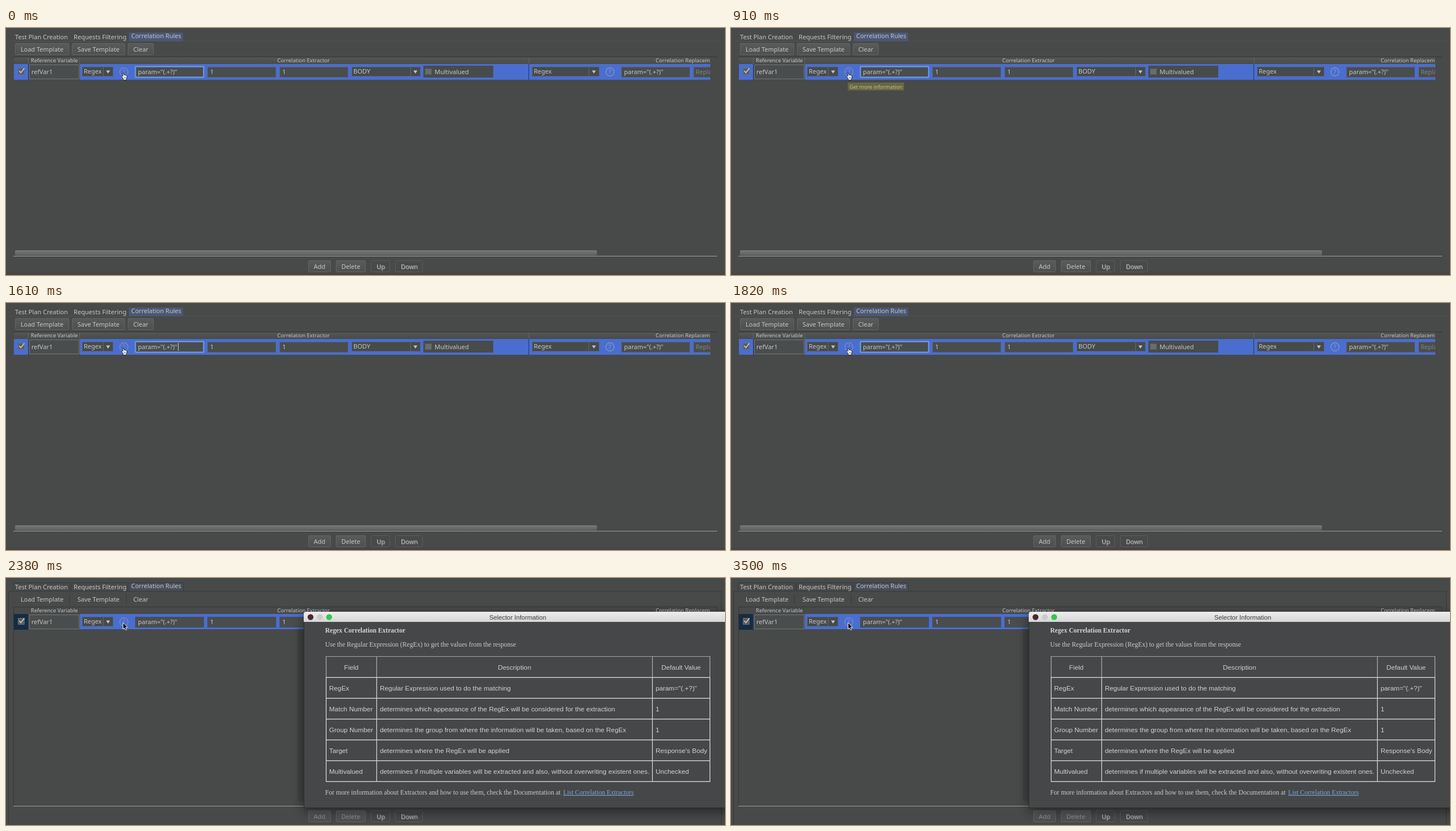
An HTML page with a canvas for the animation above (3.57 s loop, 1275 px wide and 439 px high).

```html
<!DOCTYPE html>
<html lang="en">
<head>
<meta charset="utf-8">
<title>Correlation rules</title>
<style>
html, body { margin: 0; width: 100%; height: 100%; overflow: hidden; background: #484949; }
canvas { display: block; }
</style>
</head>
<body>
<canvas id="stage" width="1275" height="439"></canvas>
<script>
const ctx = document.getElementById('stage').getContext('2d');
const LOOP = 3570, DIALOG_AT = 1890;
const TOOLTIP = [350, 1610];
const CARET_ON = [[150, 630], [1130, 1630]];
const UI = '"Noto Sans", sans-serif';
const SANS = '"Liberation Sans", Arial, sans-serif';
const SERIF = '"Liberation Serif", "Times New Roman", serif';
const BG = '#484949', BLUE = '#496ecf', TEXT = '#c6c6c6';

function text(str, x, y, color = TEXT, font = '11px ' + UI, align = 'left') {
  ctx.font = font;
  ctx.fillStyle = color;
  ctx.textAlign = align;
  ctx.fillText(str, x, y);
}

function fill(x1, y1, x2, y2, color) {
  ctx.fillStyle = color;
  ctx.fillRect(x1, y1, x2 - x1, y2 - y1);
}

function frame(x1, y1, x2, y2, color, radius = 0, width = 1) {
  ctx.strokeStyle = color;
  ctx.lineWidth = width;
  ctx.beginPath();
  ctx.roundRect(x1 + .5, y1 + .5, x2 - x1 - 1, y2 - y1 - 1, radius);
  ctx.stroke();
}

function path(points, stroke, fillColor, width = 1, close = true) {
  ctx.beginPath();
  points.forEach(([x, y]) => ctx.lineTo(x, y));
  if (close) ctx.closePath();
  if (fillColor) { ctx.fillStyle = fillColor; ctx.fill(); }
  if (stroke) { ctx.strokeStyle = stroke; ctx.lineWidth = width; ctx.stroke(); }
}

function disc(x, y, r, color) {
  ctx.fillStyle = color;
  ctx.beginPath();
  ctx.arc(x, y, r, 0, Math.PI * 2);
  ctx.fill();
}

function vertical(y1, y2, top, bottom) {
  const g = ctx.createLinearGradient(0, y1, 0, y2);
  g.addColorStop(0, top);
  g.addColorStop(1, bottom);
  return g;
}

function button(label, x1, x2, y, flat, color = TEXT) {
  if (!flat) {
    ctx.fillStyle = vertical(y, y + 21, '#595b5b', '#4e5050');
    ctx.beginPath();
    ctx.roundRect(x1, y, x2 - x1, 21, 2);
    ctx.fill();
    frame(x1, y, x2, y + 21, '#646666', 2);
  }
  text(label, (x1 + x2) / 2, y + 15, color, undefined, 'center');
}

function disabledButton(label, x1, x2, y) {
  frame(x1, y, x2, y + 21, '#5b5d5d', 2);
  const mid = (x1 + x2) / 2 + .5;
  text(label, mid + 1, y + 16, '#8f8f8f', undefined, 'center');
  text(label, mid, y + 15, '#a9a9a9', undefined, 'center');
}

function field(str, x1, x2, border, focused) {
  fill(x1, 69, x2, 88, '#4a4d4e');
  frame(x1, 69, x2, 88, border);
  if (focused) frame(x1, 68, x2, 88, '#6e9fe6', 1, 2);
  text(str, x1 + 5, 82);
}

function combo(str, x1, split, x2) {
  fill(x1, 69, x2, 86, '#474a4b');
  frame(x1, 69, x2, 86, '#55595c');
  fill(split, 70, split + 1, 85, '#64686a');
  const mid = (split + x2) / 2;
  path([[mid - 3.5, 75.5], [mid + 3.5, 75.5], [mid, 81]], null, '#c4c4c4');
  text(str, x1 + 3, 81);
}

function helpIcon(x, color) {
  ctx.strokeStyle = color;
  ctx.lineWidth = 1.2;
  ctx.beginPath();
  ctx.arc(x, 78, 7.3, 0, Math.PI * 2);
  ctx.stroke();
  text('?', x, 82, color, '11px ' + UI, 'center');
}

function tabs(behind) {
  fill(5, 23, 1269, 24, behind ? '#333435' : '#515353');
  if (behind) {
    [[12, 114], [116, 216], [218, 315]].forEach(([a, b]) => frame(a, 8, b, 24, '#37393a'));
    fill(219, 9, 314, 23, '#474e5a');
    frame(4, 23, 1269, 445, '#38393a');
  } else {
    fill(218, 8, 314, 23, '#4c5777');
  }
  const font = '11.1px ' + UI;
  text('Test Plan Creation', 16, 20, TEXT, font);
  text('Requests Filtering', 120, 20, TEXT, font);
  text('Correlation Rules', 222, 18);
}

function header(behind) {
  fill(13, 51, 1261, 52, '#323334');
  if (!behind) {
    fill(14, 52, 1249, 64, vertical(52, 64, '#545656', '#494b4b'));
    [39, 130, 927].forEach(x => fill(x, 52, x + 1, 64, '#636565'));
  }
  const font = '9.5px ' + UI;
  text('Reference Variable', 44, 61, TEXT, font);
  text('Correlation Extractor', 481, 61, TEXT, font);
  ctx.save();
  ctx.beginPath();
  ctx.rect(1100, 50, 149, 16);
  ctx.clip();
  text('Correlation Replacement', 1152, 61, TEXT, font);
  ctx.restore();
}

function checkbox() {
  fill(21, 71, 33, 83, '#5a5d5e');
  frame(21, 71, 33, 83, '#6c7073', 1);
  path([[23.5, 76], [26.3, 79.5], [32.5, 71.5]], '#cfcfcf', null, 1.6, false);
}

function row(behind) {
  const bottom = behind ? 91 : 92;
  const border = behind ? '#484c52' : '#5a6069';
  fill(14, 64, 1249, bottom, BLUE);
  fill(14, 64, 40, 92, behind ? '#142d43' : BLUE);
  fill(39, 64, 41, 92, '#36435f');
  fill(41, 64, 131, 92, '#4a4d4d');
  frame(41, 65, 130, 91, '#747676');
  text('refVar1', 45, 82);
  checkbox();

  combo('Regex', 135, 172, 190);
  helpIcon(209, '#8290bb');
  field('param="(.+?)"', 229, 351, border, !behind);
  field('1', 357, 479, border);
  field('1', 485, 607, border);
  if (behind) return;

  combo('BODY', 613, 717, 735);
  fill(740, 67, 864, 88, '#484b4c');
  fill(743, 72, 755, 83, '#6a6c6c');
  frame(743, 72, 755, 83, '#5b5d5d', 1);
  text('Multivalued', 760, 82);
  fill(926, 64, 928, 92, '#344f96');
  combo('Regex', 933, 1033, 1052);
  helpIcon(1071, '#8d9cc4');
  field('param="(.+?)"', 1091, 1213, border);
  ctx.save();
  ctx.beginPath();
  ctx.rect(1218, 64, 31, 28);
  ctx.clip();
  fill(1219, 69, 1255, 88, '#4a4d4e');
  frame(1219, 69, 1255, 88, border);
  text('Replace', 1223, 82, '#808282');
  ctx.restore();
}

function panel(behind) {
  fill(0, 0, 1275, 439, BG);
  if (!behind) fill(0, 435, 1275, 439, '#494344');
  tabs(behind);
  button('Load Template', 16, 112, 27, behind);
  button('Save Template', 117, 211, 27, behind);
  button('Clear', 216, 262, 27, behind);
  if (behind) [112, 213].forEach(x => fill(x, 29, x + 1, 47, '#38393a'));
  header(behind);
  row(behind);
  if (behind) {
    frame(13, 51, 1261, 406, '#353637');
  } else {
    ctx.fillStyle = vertical(395, 404, '#777979', '#5f6161');
    ctx.beginPath();
    ctx.roundRect(16, 395, 1032, 9, 2);
    ctx.fill();
  }
  fill(13, 405, 1261, 406, '#a0a1a1');
  const label = behind ? '#959595' : TEXT;
  button('Add', 536, 576, 413, false, label);
  button('Delete', 585, 638, 413, false, label);
  disabledButton('Up', 647, 681, 413);
  disabledButton('Down', 690, 739, 413);
}

function hand() {
  path([[207, 89], [204.5, 85.5], [206, 84.5], [207.5, 86], [206.8, 80.5], [208.6, 80.2],
    [209.5, 83.5], [211, 83.2], [212, 84], [213.5, 84], [214.7, 86], [213.7, 90], [213, 92.5], [208.5, 92.5]],
    '#1d2638', '#f4f4f4', 1);
  [209.5, 211.2].forEach(x => fill(x, 86.5, x + .7, 90, '#555'));
}

function arrow() {
  path([[207.5, 79], [207.5, 91], [210, 88.6], [212, 92.5], [214, 91.7], [212.2, 87.8], [215.8, 87.8]],
    '#eeeeee', '#0c0c0c', 1);
}

function dialog() {
  fill(517, 89, 528, 396, 'rgba(0,0,0,.1)');
  ctx.save();
  ctx.shadowColor = 'rgba(0,0,0,.5)';
  ctx.shadowBlur = 22;
  ctx.shadowOffsetY = 7;
  ctx.fillStyle = '#464748';
  ctx.beginPath();
  ctx.roundRect(528, 60, 780, 348, [4, 0, 0, 0]);
  ctx.fill();
  ctx.restore();

  ctx.fillStyle = vertical(60, 78, '#ededed', '#d6d6d6');
  ctx.beginPath();
  ctx.roundRect(528, 60, 780, 18, [4, 0, 0, 0]);
  ctx.fill();
  fill(528, 78, 529, 408, '#2c2d2e');
  fill(528, 408, 1275, 409, '#282929');
  disc(540, 69.5, 5.2, '#4c282d');
  disc(556.5, 69.5, 5.2, '#cbcbcb');
  disc(573, 69.5, 5.2, '#34c84a');
  text('Selector Information', 907.5, 73.5, '#3c3c3c', '11.3px ' + SANS, 'center');

  const serif = '11.7px ' + SERIF;
  text('Regex Correlation Extractor', 566, 97, '#d4d4d4', 'bold 11.6px ' + SERIF);
  text('Use the Regular Expression (RegEx) to get the values from the response', 566, 122, '#cacaca', serif);
  infoTable();
  text('For more information about Extractors and how to use them, check the Documentation at', 566, 385, '#cacaca', serif);
  text('List Correlation Extractors', 988, 385, '#7da6dc', serif);
  fill(988, 386, 1113, 387, '#7da6dc');
}

function infoTable() {
  const rows = [
    ['RegEx', 'Regular Expression used to do the matching', 'param="(.+?)"'],
    ['Match Number', 'determines which appearance of the RegEx will be considered for the extraction', '1'],
    ['Group Number', 'determines the group from where the information will be taken, based on the RegEx', '1'],
    ['Target', 'determines where the RegEx will be applied', "Response's Body"],
    ['Multivalued', 'determines if multiple variables will be extracted and also, without overwriting existent ones.', 'Unchecked']
  ];
  const top = 139, step = 37, bottom = top + 6 * step;
  const font = '11.8px ' + SANS;
  const columns = [567, 656.7, 1145.7, 1247.7];
  for (let i = 0; i <= 6; i++) {
    const y = top + i * step;
    fill(567, y, 1249, y + (i ? 1.4 : 1), i ? '#d4d4d4' : '#a5a5a5');
  }
  columns.forEach(x => {
    fill(x, top, x + 1.3, top + step, '#a8a8a8');
    fill(x, top + step, x + 1.3, bottom + 1, '#d4d4d4');
  });
  ['Field', 'Description', 'Default Value'].forEach((label, i) =>
    text(label, (columns[i] + columns[i + 1]) / 2 + .5, 163, '#d0d0d0', font, 'center'));
  rows.forEach((cells, r) => cells.forEach((cell, c) =>
    text(cell, [573, 663, 1152][c], 200 + r * step, '#d2d2d2', font)));
}

function draw(t) {
  const open = t >= DIALOG_AT;
  panel(open);
  if (open) {
    dialog();
    arrow();
    return;
  }
  if (CARET_ON.some(([a, b]) => t >= a && t < b)) fill(305, 71, 306, 85, '#d0d0d0');
  if (t >= TOOLTIP[0] && t < TOOLTIP[1]) {
    fill(207, 97, 307, 111, '#69673f');
    text('Get more information', 210, 107.5, '#bfbfa9', '9.2px ' + UI);
  }
  hand();
}

const start = performance.now();
function tick() {
  draw((performance.now() - start) % LOOP);
  requestAnimationFrame(tick);
}
tick();
</script>
</body>
</html>
```
